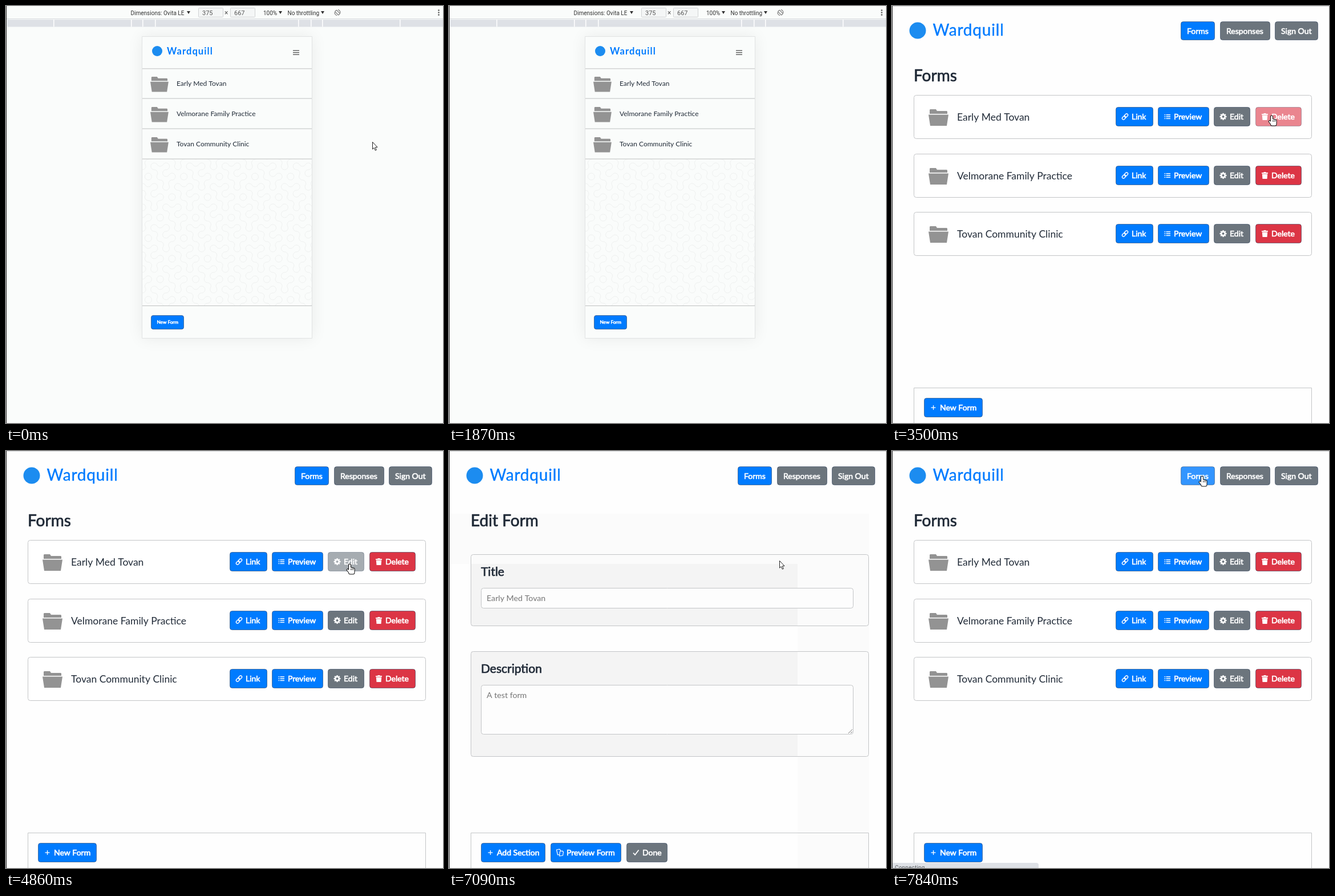
An HTML page with a canvas for the animation above (7990 ms loop, 766x731 px).

```html
<!DOCTYPE html>
<html lang="en">
<head>
<meta charset="utf-8">
<title>Form manager</title>
<style>
html, body { margin: 0; width: 100%; height: 100%; overflow: hidden; background: #fefefe; }
canvas { display: block; width: 766px; height: 731px; }
</style>
</head>
<body>
<canvas id="stage" width="766" height="731"></canvas>
<script>
const W = 766, H = 731, LOOP = 7990, TICK = 1000 / 7.5;
const DESKTOP_AT = 2650, EDIT_AT = 5420, SHADE_AT = 5840, STATUS_END = 5990, BACK_AT = 7840;
const BRAND = 'Wardquill';
const CLINICS = ['Early Med Tovan', 'Velmorane Family Practice', 'Tovan Community Clinic'];
const BLUE = '#007bff', GRAY = '#6c757d', RED = '#dc3545', INK = '#212b38', LINE = '#c3c5c7';
const EDGE = 'rgba(20,40,70,.5)', LOGO = '#1c8cf0';

const ctx = document.getElementById('stage').getContext('2d');
let pointer = null, hovering = false;

// The pointer is sampled at a fixed rate and eases out into each target.
const glide = (from, to, x, y) => ({ from, to, x, y });
const GLIDES = [
  glide(0, 5, 637, 218), glide(7, 11, 664, 41), glide(11, 13, 706, 4),
  glide(22, 23, 756, 7), glide(23, 26, 665, 192), glide(26, 30, 614, 260),
  glide(32, 35, 602, 198), glide(42, 45, 602, 206), glide(50, 52, 592, 206),
  glide(52, 53, 579, 192), glide(53, 57, 543, 44)
];

function pointerAt(t) {
  const tick = Math.floor((t + 30) / TICK);
  if (tick > 13 && tick < 23) return null;
  let x = 642, y = 238;
  for (const g of GLIDES) {
    const p = Math.min(Math.max((tick - g.from) / (g.to - g.from), 0), 1);
    const eased = Math.sin(p * Math.PI / 2);
    x += (g.x - x) * eased;
    y += (g.y - y) * eased;
  }
  return { x: Math.round(x), y: Math.round(y) };
}

function rect(x, y, w, h, color) {
  ctx.fillStyle = color;
  ctx.fillRect(x, y, w, h);
}

function box(x, y, w, h, r, fill, stroke) {
  ctx.beginPath();
  ctx.roundRect(x + .5, y + .5, w - 1, h - 1, r);
  if (fill) { ctx.fillStyle = fill; ctx.fill(); }
  if (stroke) { ctx.strokeStyle = stroke; ctx.lineWidth = 1; ctx.stroke(); }
}

function disc(x, y, r, color) {
  ctx.beginPath();
  ctx.arc(x, y, r, 0, Math.PI * 2);
  ctx.fillStyle = color;
  ctx.fill();
}

function text(s, x, y, size, color = INK, { family = 'Lato', weight = 400, spacing = 0, bolder = 0 } = {}) {
  ctx.font = `${weight} ${size}px ${family}, sans-serif`;
  ctx.letterSpacing = spacing + 'px';
  ctx.fillStyle = color;
  ctx.fillText(s, x, y);
  if (bolder) {
    ctx.strokeStyle = color;
    ctx.lineWidth = bolder;
    ctx.lineJoin = 'round';
    ctx.strokeText(s, x, y);
  }
}

function shape(d, fill, stroke, width = 1) {
  const path = new Path2D(d);
  if (fill) { ctx.fillStyle = fill; ctx.fill(path); }
  if (stroke) { ctx.strokeStyle = stroke; ctx.lineWidth = width; ctx.lineJoin = 'round'; ctx.stroke(path); }
}

function at(x, y, scale, draw) {
  ctx.save();
  ctx.translate(x, y);
  ctx.scale(scale, scale);
  draw();
  ctx.restore();
}

function folder(x, y, scale) {
  at(x, y, scale, () => shape('M2 8V1L3 0H13L15 3H32L33 4V8Z M0 9.5H35L32 29H3Z', '#939393'));
}

// Icons are centred on the origin.
const ICONS = {
  link() {
    ctx.rotate(-Math.PI / 4);
    ctx.strokeStyle = '#fff';
    ctx.lineWidth = 1.4;
    for (const x of [-6.2, -.8]) {
      ctx.beginPath();
      ctx.roundRect(x, -2.3, 7, 4.6, 2.3);
      ctx.stroke();
    }
  },
  list() {
    for (let y = -4; y < 4; y += 3.3) {
      rect(-5, y, 1.7, 1.5, '#fff');
      rect(-2, y, 7.5, 1.5, '#fff');
    }
  },
  gear() {
    ctx.strokeStyle = '#fff';
    ctx.lineWidth = 2.6;
    ctx.beginPath();
    ctx.arc(0, 0, 3.3, 0, Math.PI * 2);
    ctx.stroke();
    for (let i = 0; i < 8; i++) {
      ctx.rotate(Math.PI / 4);
      rect(-1.2, -6, 2.4, 2.5, '#fff');
    }
  },
  trash() {
    rect(-5.5, -5, 11, 1.8, '#fff');
    rect(-2, -6, 4, 1.5, '#fff');
    shape('M-4.7 -2.4H4.7L4 6H-4Z', '#fff');
  },
  plus() {
    rect(-4, -.6, 8, 1.3, '#fff');
    rect(-.6, -4, 1.3, 8, '#fff');
  },
  copy() {
    shape('M-6 -5L-1 -6L1 -4V3L-4 4Z', null, '#fff', 1.2);
    shape('M0 -2L4 -3L6 -1L5 5L-1 6Z', BLUE, '#fff', 1.2);
  },
  check() {
    shape('M-4.5 .5L-1.5 4L5 -4.5', null, '#fff', 1.8);
  }
};

function button(label, x, y, w, color, icon) {
  const h = icon ? 34 : 33;
  const hot = pointer && pointer.x >= x && pointer.x < x + w && pointer.y >= y && pointer.y < y + h;
  if (hot) {
    hovering = true;
    ctx.globalAlpha = icon ? .6 : .8;
  }
  box(x, y, w, h, 4, color, EDGE);
  ctx.globalAlpha = 1;
  if (icon) at(x + 16.5, y + 17, 1, ICONS[icon]);
  text(label, x + (icon ? 28 : 11), y + 22, 14, '#fff', { bolder: .7 });
}

// Hexagon tiles whose arcs join neighbouring edges into loops and trefoils.
function loopPattern(x, y, w, h) {
  const side = 12, dx = side * Math.sqrt(3), dy = side * 1.5;
  ctx.save();
  ctx.beginPath();
  ctx.rect(x, y, w, h);
  ctx.clip();
  ctx.strokeStyle = '#eff1f0';
  ctx.lineWidth = 1;
  for (let row = 0; row * dy < h + side; row++) {
    for (let col = 0; col * dx < w + dx; col++) {
      const cx = x + (col + row % 2 / 2) * dx, cy = y + row * dy;
      for (let k = (col + 2 * row) % 3 ? 1 : 0; k < 6; k += 2) {
        const a = Math.PI / 6 + k * Math.PI / 3;
        ctx.beginPath();
        ctx.arc(cx + side * Math.cos(a), cy + side * Math.sin(a), side / 2, a + Math.PI * 2 / 3, a + Math.PI * 4 / 3);
        ctx.stroke();
      }
    }
  }
  ctx.restore();
}

function deviceToolbar() {
  const label = (s, x, size = 10, color = '#333') => text(s, x, 15.5, size, color, { family: 'Roboto' });
  const caret = x => shape(`M${x} 9h6l-3 5z`, '#333');
  rect(0, 22, W, 1, '#d5d8db');
  label('Dimensions: Ovita LE', 218.5);
  caret(317);
  for (const [x, value] of [[337, '375'], [393, '667']]) {
    box(x, 3, 44, 17, 1, '#f4f6f6', '#d0d2d4');
    label(value, x + 7, 11, '#555');
  }
  label('×', 383, 12, '#555');
  label('100%', 451);
  caret(478);
  label('No throttling', 493.5);
  caret(552);
  at(581, 11.5, 1, () => {
    ctx.rotate(-Math.PI / 4);
    box(-2.5, -5, 5, 10, 1, null, '#666');
    ctx.beginPath();
    ctx.arc(0, 0, 5, -.6, 1);
    ctx.stroke();
    ctx.beginPath();
    ctx.arc(0, 0, 5, 2.5, 4.1);
    ctx.stroke();
  });
  for (let y = 7.5; y < 16; y += 4) disc(758.5, y, 1.3, '#555');
  rect(2, 24, W - 2, 12.5, '#dee1e6');
  for (const reach of [126, 148, 168, 304]) {
    rect(387 - reach, 24, 1.5, 12.5, '#fff');
    rect(386 + reach, 24, 1.5, 12.5, '#fff');
  }
}

function mobilePage() {
  const paper = '#fafcfb', rule = y => rect(239, y, 297, 1, '#bfc1c1');
  rect(0, 0, W, H, paper);
  deviceToolbar();
  ctx.save();
  ctx.shadowColor = 'rgba(0,0,0,.07)';
  ctx.shadowBlur = 26;
  rect(238, 53, 299, 530, paper);
  ctx.restore();
  box(238, 53, 299, 530, 0, paper, '#e1e3e3');
  disc(265, 79, 9, LOGO);
  text(BRAND, 282, 85, 16.5, BLUE, { weight: 700, spacing: 1.1 });
  for (let y = 77.5; y < 85; y += 3.5) rect(503, y, 11, 1.2, '#444');
  loopPattern(239, 269, 297, 256);
  rule(109.4);
  CLINICS.forEach((name, i) => {
    const y = i * 53;
    folder(253, y + 124, .91);
    text(name, 299, y + 139.5, 12);
    rule(y + 161.6);
  });
  rule(525);
  box(254, 542, 58, 25, 3.5, BLUE, EDGE);
  text('New Form', 264.5, 557, 8.2, '#fff', { bolder: .6 });
}

function navigation() {
  disc(45, 43, 14.5, LOGO);
  text(BRAND, 71.5, 52, 28, BLUE, { spacing: .8, bolder: .4 });
  button('Forms', 506, 27, 60, BLUE);
  button('Responses', 575, 27, 88, GRAY);
  button('Sign Out', 671, 27, 76, GRAY);
}

function heading(s, x, y, size) {
  text(s, x, y, size, INK, { bolder: .7 });
}

function footer() {
  box(38, 669, 698, 80, 0, null, LINE);
}

function formsPage() {
  navigation();
  heading('Forms', 38, 132, 28);
  CLINICS.forEach((name, i) => {
    const y = Math.round(156 + i * 102.7);
    box(38, y, 698, 77, 4, '#fff', LINE);
    folder(64, y + 25, 1);
    text(name, 114, y + 45, 17.5);
    button('Link', 392, y + 21, 66, BLUE, 'link');
    button('Preview', 466, y + 21, 90, BLUE, 'list');
    button('Edit', 564, y + 21, 64, GRAY, 'gear');
    button('Delete', 637, y + 21, 81, RED, 'trash');
  });
  footer();
  button('New Form', 56, 687, 103, BLUE, 'plus');
}

function field(label, value, y, cardHeight, fieldHeight, shaded) {
  const shadeTop = Math.max(y, 198);
  box(38, y, 698, cardHeight, 4, '#fbfbfb');
  if (shaded) rect(39, shadeTop, 572, y + cardHeight - shadeTop, '#f4f4f4');
  box(38, y, 698, cardHeight, 4, null, LINE);
  heading(label, 56, y + 37.5, 21);
  box(56, y + 59, 653, fieldHeight, 4, '#fdfdfd', LINE);
  text(value, 66, y + 81.5, 14.2, '#757575');
}

function editPage(shaded) {
  rect(1, 110, 735, H - 110, '#fbfbfb');
  if (shaded) rect(1, 198, 610, H - 198, '#fefefe');
  navigation();
  heading('Edit Form', 38, 132, 28);
  field('Title', CLINICS[0], 181, 126, 36, shaded);
  field('Description', 'A test form', 351, 185, 87, shaded);
  shape('M700 495l7 -7M704 495l3 -3', null, '#777');
  footer();
  button('Add Section', 56, 687, 113, BLUE, 'plus');
  button('Preview Form', 178, 687, 124, BLUE, 'copy');
  button('Done', 311, 687, 72, GRAY, 'check');
}

function statusBar() {
  ctx.beginPath();
  ctx.roundRect(0, 722, 257, 20, [0, 4, 0, 0]);
  ctx.fillStyle = '#dee1e6';
  ctx.fill();
  text('Connecting...', 5, 734, 10, '#5f6368', { family: 'Roboto', spacing: .2 });
}

function arrowPointer() {
  shape('M.5 .5V13L3.3 10.5L5.3 15.2L7.3 14.3L5.3 9.8L9 9.5Z', '#fff', '#222');
}

function handPointer() {
  const hand = new Path2D();
  hand.roundRect(-1, .5, 3, 12, 1.5);
  for (let i = 1; i < 4; i++) hand.roundRect(2.2 * i - 1, 5.5 + i * .7, 3, 7, 1.5);
  hand.roundRect(-1, 9, 9.5, 8.5, 2.5);
  hand.moveTo(-1, 15);
  hand.lineTo(-4.5, 10.5);
  hand.lineTo(-3, 9);
  hand.lineTo(0, 12);
  ctx.strokeStyle = '#111';
  ctx.lineWidth = 2;
  ctx.stroke(hand);
  ctx.fillStyle = '#fff';
  ctx.fill(hand);
  for (let x = 2; x < 8; x += 2.2) rect(x, 8, .7, 3, '#111');
}

function draw(t) {
  pointer = pointerAt(t);
  hovering = false;

  const editing = t >= EDIT_AT && t < BACK_AT;
  if (t < DESKTOP_AT) {
    mobilePage();
  } else {
    rect(0, 0, W, H, '#fefefe');
    if (editing) editPage(t >= SHADE_AT);
    else formsPage();
    rect(0, 0, W, 1, '#d8dadc');
  }
  if ((t >= EDIT_AT && t < STATUS_END) || t >= BACK_AT) statusBar();
  rect(0, 0, 1, H, '#2b2b2b');
  if (pointer) at(pointer.x, pointer.y, 1, hovering ? handPointer : arrowPointer);
}

const start = performance.now();
function tick() {
  draw((performance.now() - start) % LOOP);
  requestAnimationFrame(tick);
}
tick();
</script>
</body>
</html>
```
